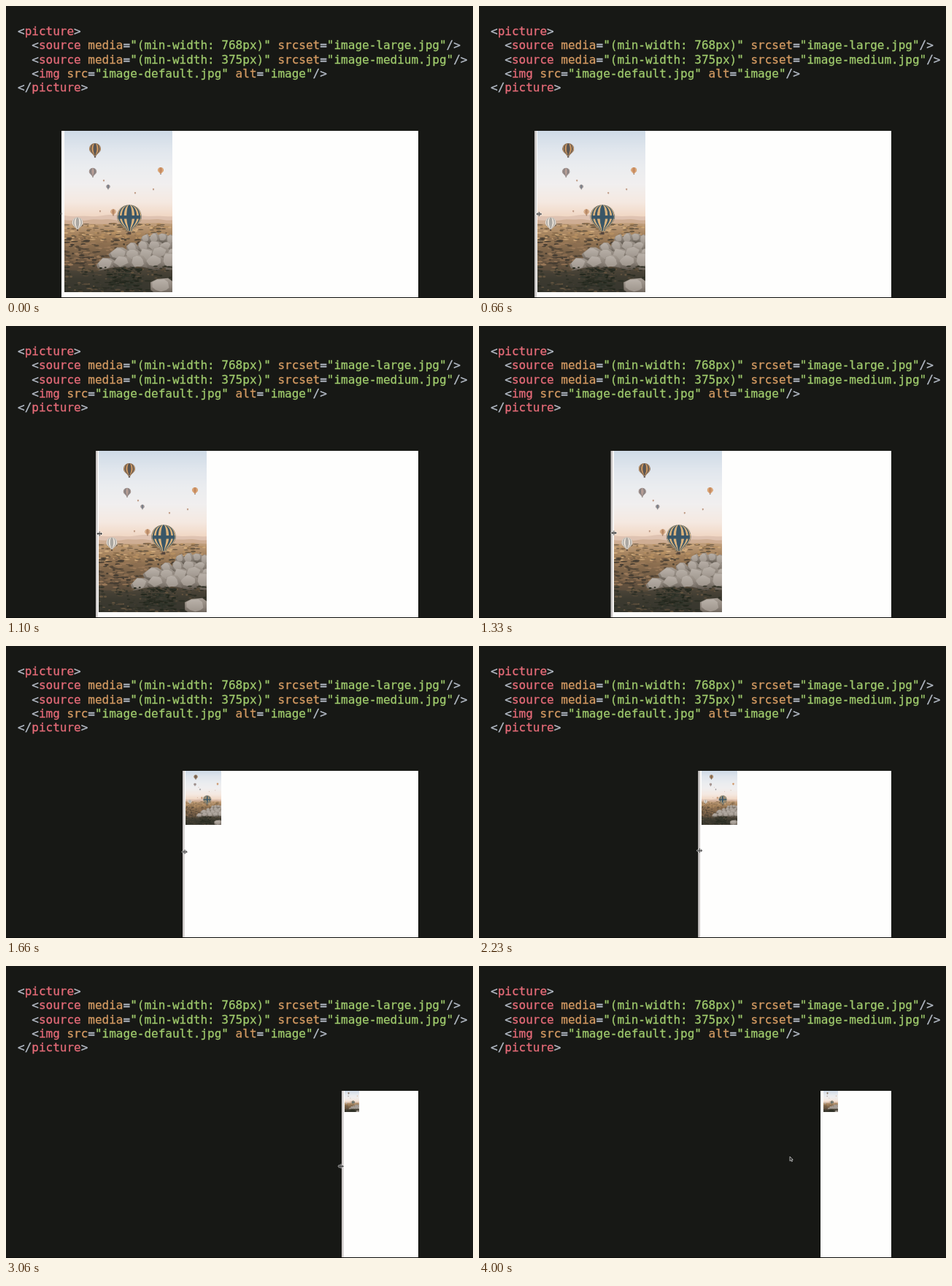
An HTML page with a canvas for the animation above (4.06 s loop, 640x400 px).

```html
<!DOCTYPE html>
<html lang="en">
<head>
<meta charset="utf-8">
<title>Responsive picture element</title>
<style>
html, body { margin: 0; width: 100%; height: 100%; overflow: hidden; background: #171815; }
canvas { display: block; width: 640px; height: 400px; }
</style>
</head>
<body>
<canvas id="stage" width="640" height="400"></canvas>
<script>
const LOOP = 4060;
const TOP = 171, RIGHT = 565, BOTTOM = 399;
const PIC_W = 148, PIC_H = 221;
const ctx = document.getElementById("stage").getContext("2d");

// Time and left edge of the page while it is dragged
const DRAG = [[630, 76], [860, 86.7], [1100, 123], [1160, 141], [1660, 242],
  [2230, 300.5], [2760, 371], [3060, 460], [3260, 468]];
const FIRST = DRAG[0][1], LAST = DRAG[DRAG.length - 1][1];

// Monotone cubic interpolation
function leftAt(t) {
  const n = DRAG.length - 1;
  if (t <= DRAG[0][0]) return FIRST;
  if (t >= DRAG[n][0]) return LAST;
  const rate = i => (DRAG[i + 1][1] - DRAG[i][1]) / (DRAG[i + 1][0] - DRAG[i][0]);
  const slope = i => {
    if (i === 0 || i === n) return 0;
    const a = rate(i - 1), b = rate(i);
    return 2 * a * b / (a + b);
  };
  const i = DRAG.findIndex(([end]) => end >= t) - 1;
  const [t0, x0] = DRAG[i], [t1, x1] = DRAG[i + 1];
  const h = t1 - t0, u = (t - t0) / h, v = 1 - u;
  return x0 * v * v * (1 + 2 * u) + slope(i) * h * u * v * v
    + x1 * u * u * (3 - 2 * u) - slope(i + 1) * h * u * u * v;
}

const clamp = x => Math.min(1, Math.max(0, x));
const ease = u => u * u * (3 - 2 * u);

function random(seed) {
  return () => {
    seed = (seed * 16807) % 2147483647;
    return seed / 2147483647;
  };
}

function gradient(g, y0, y1, ...colors) {
  const fill = g.createLinearGradient(0, y0, 0, y1);
  colors.forEach((color, i) => fill.addColorStop(i / (colors.length - 1), color));
  return fill;
}

function envelope(g, x, y, rx, r) {
  g.beginPath();
  g.moveTo(x - rx, y);
  g.bezierCurveTo(x - rx, y - r * 1.33, x + rx, y - r * 1.33, x + rx, y);
  g.bezierCurveTo(x + rx, y + r * 0.55, x + rx * 0.3, y + r * 0.8, x + rx * 0.22, y + r * 1.15);
  g.lineTo(x - rx * 0.22, y + r * 1.15);
  g.bezierCurveTo(x - rx * 0.3, y + r * 0.8, x - rx, y + r * 0.55, x - rx, y);
  g.fill();
}

function balloon(g, x, y, r, dark, light, gores = 3) {
  for (let i = gores; i > 0; i--) {
    g.fillStyle = (gores - i) % 2 ? light : dark;
    envelope(g, x, y, r * Math.sin(i / gores * Math.PI / 2), r);
  }
  g.fillStyle = "#54453c";
  g.fillRect(x - r * 0.14, y + r * 1.22, r * 0.28, r * 0.22);
}

// A ridge line filled down to the bottom of the picture
function ridge(g, y, swing, wave, fill) {
  g.fillStyle = fill;
  g.beginPath();
  g.moveTo(0, PIC_H);
  for (let x = 0; x <= PIC_W; x += 4) {
    g.lineTo(x, y + swing * (Math.sin(x / wave) + 0.4 * Math.sin(x / wave * 3.1)));
  }
  g.lineTo(PIC_W, PIC_H);
  g.fill();
}

function boulder(g, rnd, x, y, w, h) {
  const outline = [];
  for (let a = 0; a < 9; a++) {
    const turn = (a + rnd() * 0.6) / 9 * 2 * Math.PI, far = 0.82 + rnd() * 0.3;
    outline.push([x + Math.cos(turn) * w / 2 * far, y + Math.sin(turn) * h / 2 * far]);
  }
  const shape = (dx, dy, k, fill) => {
    g.fillStyle = fill;
    g.beginPath();
    for (const [px, py] of outline) g.lineTo(x + (px - x) * k + dx * w, y + (py - y) * k + dy * h);
    g.fill();
  };
  shape(0.06, 0.1, 1, "#4d473f");
  shape(0, 0, 1, gradient(g, y - h / 2, y + h / 2, "#a69d94", "#8b8279", "#5d564d"));
  shape(-0.08, -0.1, 0.68, gradient(g, y - h / 2, y + h / 2, "#bcb4ac", "#948b82"));
}

function specks(g, rnd, n, x, y, w, h, size, colors) {
  for (let i = 0; i < n; i++) {
    g.fillStyle = colors[Math.floor(rnd() * colors.length)];
    g.beginPath();
    g.ellipse(x + rnd() * w, y + rnd() * h, size * (0.5 + rnd() * 1.5), size * (0.2 + rnd() * 0.4), 0, 0, 7);
    g.fill();
  }
}

function makePhoto() {
  const c = document.createElement("canvas");
  c.width = PIC_W * 2;
  c.height = PIC_H * 2;
  const g = c.getContext("2d"), rnd = random(31);
  g.scale(2, 2);

  g.fillStyle = gradient(g, 0, 122, "#cfdbe7", "#e0e6ed", "#ebedf0", "#f1efef", "#f5e9e1", "#f0d3bd");
  g.fillRect(0, 0, PIC_W, PIC_H);

  // Hazy hills, plain and slope
  ridge(g, 116, 1.2, 17, "#dfc3b2");
  ridge(g, 122, 0.8, 11, "#cfae94");
  ridge(g, 127, 0.7, 23, gradient(g, 126, PIC_H, "#c3a17e", "#9f7d58", "#7e654a", "#64523f", "#4b4337", "#3a382f"));
  specks(g, rnd, 200, 0, 127, PIC_W, 24, 2.4, ["#cfaa7c", "#8a6d4c", "#b58f62", "#6d5b45"]);
  specks(g, rnd, 200, 0, 147, 105, 40, 2.6, ["#594a39", "#8b6d50", "#463d32", "#9a7959"]);

  // Boulders grow and spread to the left towards the front
  for (let row = 0; row < 4; row++) {
    const size = 14 + row * 4;
    for (let x = 112 - row * 18; x < PIC_W + 8; x += size * 0.85) {
      boulder(g, rnd, x, 146 + row * 11 + rnd() * 5, size * (0.9 + rnd() * 0.4), size * (0.8 + rnd() * 0.4));
    }
  }

  // Dark scrub in the foreground
  ridge(g, 189, 2.5, 19, gradient(g, 186, PIC_H, "#51483b", "#3c3a30", "#37362e"));
  specks(g, rnd, 200, 0, 185, PIC_W, 36, 2.2, ["#2b2d23", "#564a39", "#665640", "#37372c"]);
  specks(g, rnd, 110, 60, 188, 45, 30, 2.4, ["#23271d", "#30342a", "#292c22"]);
  boulder(g, rnd, 134, 214, 36, 24);

  const gold = "#d2995f", navy = "#3a5667", cream = "#dfb57d", haze = "#b39c94";
  balloon(g, 42, 25, 8, "#5a5552", gold, 5);
  balloon(g, 39, 56, 5.2, "#7b7a7d", haze, 4);
  balloon(g, 132, 54, 4, "#c58b62", "#e3ae79");
  balloon(g, 60, 76.5, 2.7, "#78808b", haze);
  balloon(g, 67, 111, 3.7, "#b88968", "#dfb58e");
  balloon(g, 18, 126, 7.5, "#a9a6a1", "#eee5da", 5);
  for (const [x, y] of [[54, 68], [97, 85], [122, 80], [49, 110]]) {
    balloon(g, x, y, 1.15, "#b7937e", "#cfaa94");
  }
  balloon(g, 89, 118, 16.7, navy, cream, 7);
  g.fillStyle = navy;
  g.fillRect(73.5, 116, 31, 4.5);
  return c;
}

const PAL = { p: "#b4bbc6", t: "#e56b78", a: "#d39a62", s: "#9fca6c" };
const attr = (name, value) => [["a", " " + name], ["p", "="], ["s", '"' + value + '"']];
const source = (width, file) => [["p", "  <"], ["t", "source"],
  ...attr("media", `(min-width: ${width}px)`), ...attr("srcset", file), ["p", "/>"]];
const CODE = [
  [["p", "<"], ["t", "picture"], ["p", ">"]],
  source(768, "image-large.jpg"),
  source(375, "image-medium.jpg"),
  [["p", "  <"], ["t", "img"], ...attr("src", "image-default.jpg"), ...attr("alt", "image"), ["p", "/>"]],
  [["p", "</"], ["t", "picture"], ["p", ">"]]
];

function drawCode() {
  ctx.font = '16px "DejaVu Sans Mono", monospace';
  ctx.lineWidth = 0.3;
  CODE.forEach((line, i) => {
    let x = 16;
    const y = 40.2 + i * 19.25;
    for (const [kind, text] of line) {
      ctx.fillStyle = ctx.strokeStyle = PAL[kind];
      ctx.fillText(text, x, y);
      ctx.strokeText(text, x, y);
      x += ctx.measureText(text).width;
    }
  });
}

function resizePointer(x, y) {
  for (const [color, width] of [["rgba(255,255,255,.75)", 2], ["#303030", 1]]) {
    ctx.strokeStyle = color;
    ctx.lineWidth = width;
    ctx.beginPath();
    for (const side of [-1, 1]) {
      ctx.moveTo(x, y);
      ctx.lineTo(x + side * 3, y);
      ctx.moveTo(x + side * 1.6, y - 1.6);
      ctx.lineTo(x + side * 3.2, y);
      ctx.lineTo(x + side * 1.6, y + 1.6);
      ctx.moveTo(x, y);
      ctx.lineTo(x, y + side * 3);
    }
    ctx.stroke();
  }
}

const ARROW = new Path2D("M0 0V6.2L1.5 4.9 2.6 7 3.5 6.5 2.5 4.5 4.3 4.3Z");

function arrowPointer(x, y) {
  ctx.save();
  ctx.translate(x, y);
  ctx.fillStyle = "#222";
  ctx.strokeStyle = "#c9c9c9";
  ctx.lineWidth = 0.8;
  ctx.fill(ARROW);
  ctx.stroke(ARROW);
  ctx.restore();
}

function drawPointer(t, left) {
  const u = (left - FIRST) / (LAST - FIRST);
  const x = left + 6 - 7 * u, y = 285 - 11 * u ** 1.5;
  const away = ease(clamp((t - 3830) / 170));
  if (t < DRAG[0][0]) {
    ctx.fillStyle = "#8a8a8a";
    ctx.fillRect(75.3, 283.3, 1.7, 2.4);
  } else if (away > 0) {
    arrowPointer(x - 41 * away, y - 13 * away);
  } else {
    resizePointer(x, y);
  }
}

const photo = makePhoto();

function drawPage(t, left) {
  ctx.fillStyle = "#fefefd";
  ctx.fillRect(left, TOP, RIGHT - left, BOTTOM - TOP);

  // The drag handle shows while hovered
  const hover = clamp(t / 100) * clamp((4000 - t) / 140);
  ctx.fillStyle = `rgba(198,194,192,${0.1 + 0.77 * hover})`;
  ctx.fillRect(left, TOP, 2.6, BOTTOM - TOP);

  const width = (RIGHT - left) * 2;
  const scale = width >= 768 ? 1 : width >= 375 ? 1 / 3 : 0.1325;
  ctx.imageSmoothingQuality = "high";
  ctx.drawImage(photo, left + 4, TOP, PIC_W * scale, PIC_H * scale);
}

function draw(now) {
  // 30 steps per second on a 10 ms clock
  const step = Math.min(120, Math.floor((now % LOOP + 7) * 0.03));
  const t = Math.floor(step * 10 / 3 + 1e-6) * 10;
  const left = leftAt(t);

  ctx.fillStyle = "#171815";
  ctx.fillRect(0, 0, 640, 400);
  ctx.fillStyle = "#0c0d0b";
  ctx.fillRect(0, 399, 640, 1);
  drawCode();
  drawPage(t, left);
  drawPointer(t, left);
}

const start = performance.now();
function tick() {
  draw(performance.now() - start);
  requestAnimationFrame(tick);
}
tick();
</script>
</body>
</html>
```
